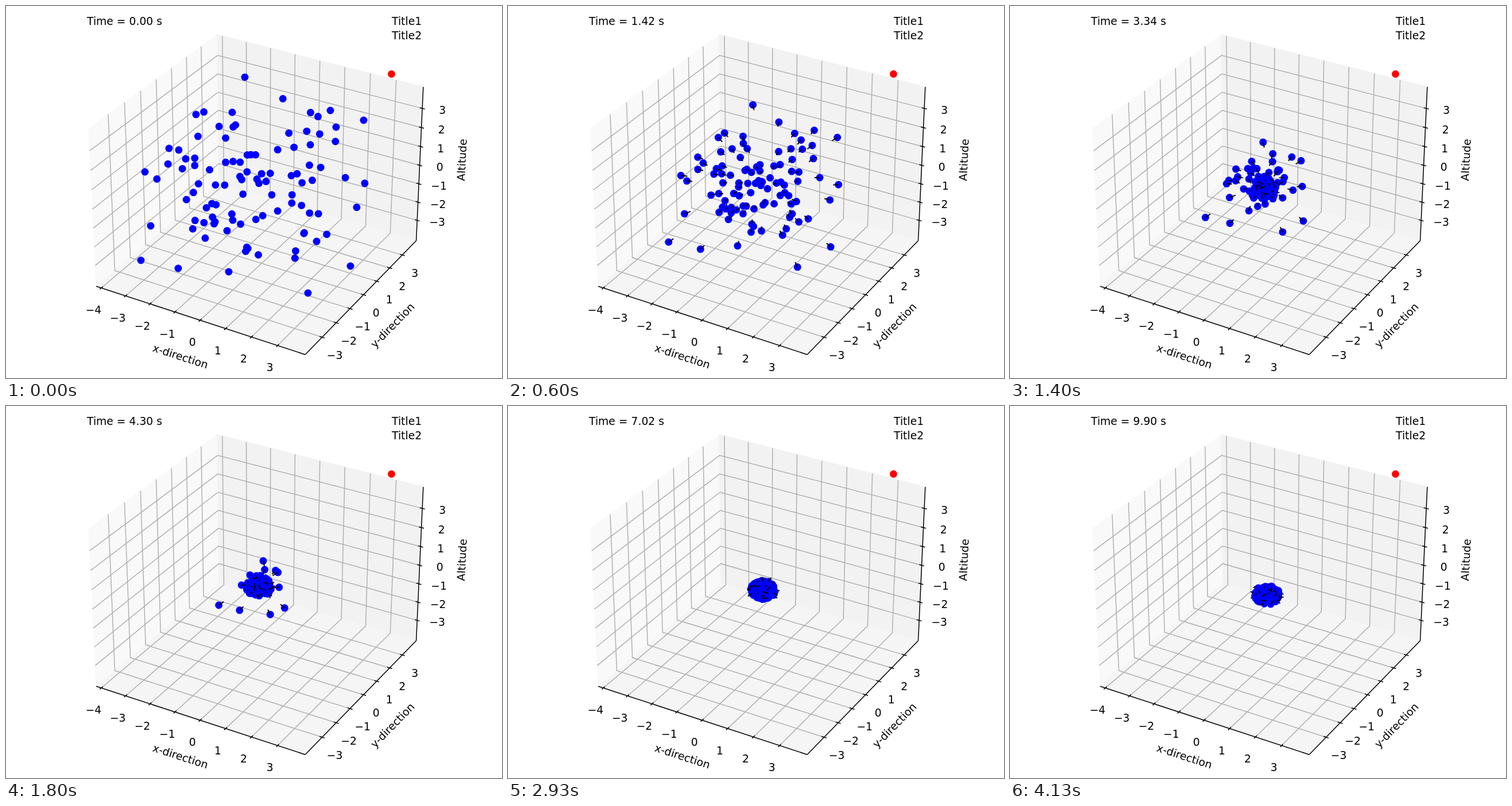
An HTML page for the animation above (4.19 s loop, 864 by 648 pixels).

```html
<!DOCTYPE html>
<html lang="en">
<head>
<meta charset="utf-8">
<title>Swarm in a box</title>
<style>
  html, body { margin: 0; width: 100%; height: 100%; overflow: hidden; background: #fff; }
  svg { display: block; width: 864px; height: 648px; }
  text { font: 18.75px "DejaVu Sans", sans-serif; fill: #000; }
</style>
</head>
<body>
<svg id="stage" viewBox="0 0 864 648"></svg>
<script>
const LOOP = 4190, LAST_STEP = 62;
const stage = document.getElementById("stage");

function add(parent, tag, attrs, content) {
  const node = document.createElementNS("http://www.w3.org/2000/svg", tag);
  for (const key in attrs) node.setAttribute(key, attrs[key]);
  if (content !== undefined) node.textContent = content;
  return parent.appendChild(node);
}

// Perspective camera: elevation 30, azimuth -60, distance 10
function project([x, y, z]) {
  const depth = 10 - (0.433 * x - 0.75 * y + 0.5 * z);
  const right = 0.866 * x + 0.5 * y;
  const up = -0.25 * x + 0.433 * y + 0.866 * z;
  return [441 + 3505 * right / depth, 315.2 - 3505 * up / depth];
}

const path = points => points.map(p => project(p).map(v => v.toFixed(2)).join()).join(" ");
const line = (points, stroke) =>
  add(stage, "polyline", { points: path(points), fill: "none", stroke, "stroke-width": 1.5 });
const pane = (points, fill) =>
  add(stage, "polygon", { points: path(points), fill, stroke: fill, "stroke-width": 1.5 });

function label(content, x, y, angle = 0) {
  add(stage, "text", {
    "text-anchor": "middle", y: 6.8,
    transform: `translate(${x.toFixed(2)} ${y.toFixed(2)}) rotate(${angle})`
  }, content);
}

// Half sizes of the box and the half length of a tick
const W = 0.595, H = 0.4464, TICK = 0.014;

const axes = [
  {
    from: -4, at: v => 0.0123 + 0.1442 * v, offset: [-13.5, 38],
    grid: x => [[x, -W, -H], [x, W, -H], [x, W, H]],
    tick: x => [[x, -W - TICK, -H], [x, -W, -H], [x, -W + TICK, -H]],
    edge: [[-W, -W, -H], [W, -W, -H]]
  },
  {
    from: -3, at: v => 0.003 + 0.1434 * v, offset: [22, 31.5],
    grid: y => [[W, y, -H], [-W, y, -H], [-W, y, H]],
    tick: y => [[W - TICK, y, -H], [W, y, -H], [W + TICK, y, -H]],
    edge: [[W, -W, -H], [W, W, -H]]
  },
  {
    from: -3, at: v => 0.001 + 0.1084 * v, offset: [35, 3],
    grid: z => [[-W, -W, z], [-W, W, z], [W, W, z]],
    tick: z => [[W - TICK, W, z], [W, W, z], [W + TICK, W, z]],
    edge: [[W, W, -H], [W, W, H]]
  }
];

function drawBox() {
  pane([[-W, -W, -H], [-W, W, -H], [-W, W, H], [-W, -W, H]], "#f9f9f9");
  pane([[-W, W, -H], [W, W, -H], [W, W, H], [-W, W, H]], "#f2f2f2");
  pane([[-W, -W, -H], [W, -W, -H], [W, W, -H], [-W, W, -H]], "#f5f5f5");
  for (const axis of axes)
    for (let v = axis.from; v <= 3; v++) line(axis.grid(axis.at(v)), "#b0b0b0");
  for (const axis of axes) {
    line(axis.edge, "#000");
    for (let v = axis.from; v <= 3; v++) {
      const tick = axis.tick(axis.at(v));
      const [x, y] = project(tick[1]);
      line(tick, "#000");
      label(v < 0 ? "\u2212" + -v : v, x + axis.offset[0], y + axis.offset[1]);
    }
  }
  label("x-direction", 304, 610, 18);
  label("y-direction", 673, 556, -45.7);
  label("Altitude", 794, 268, -87.3);
  add(stage, "text", { x: 672, y: 32.5 }, "Title1");
  add(stage, "text", { x: 672, y: 58 }, "Title2");
  add(stage, "circle", { cx: 671.5, cy: 118.5, r: 6.5, fill: "#f00" });
}

let seed = 11;
function random() {
  seed = (seed * 16807) % 2147483647;
  return seed / 2147483647;
}

const COUNT = 100, CENTER = [443, 314];

// The outermost dots give the swarm its outline
const outline = [
  [416, 124], [565, 182], [623, 199], [600, 453], [526, 500], [388, 463],
  [300, 457], [235, 443], [252, 383], [242, 289], [284, 248], [331, 189]
];

// A random place in a ball, seen from the front
function scatter() {
  const angle = random() * 2 * Math.PI;
  const radius = Math.sqrt(1 - random() ** (2 / 3));
  return [447 + 185 * radius * Math.cos(angle), 308 + 155 * radius * Math.sin(angle)];
}

function makeDot([x, y]) {
  const group = add(stage, "g", {});
  add(group, "circle", { r: 6.5, fill: "#00f" });
  return {
    x, y, group,
    tail: add(group, "line", { stroke: "#000", "stroke-width": 1.9 }),
    arrival: Math.hypot((CENTER[0] - x) / 50, (CENTER[1] - y) / 41, 3.1),
    angle: random() * 2 * Math.PI,
    radius: Math.sqrt(random()),
    heading: random() * 2 * Math.PI,
    spin: random() - 0.5
  };
}

// Steady flight to a place in the cluster, then a slow swirl
function moveDot(dot, time) {
  const progress = Math.min(1, time / dot.arrival);
  const settled = Math.max(0, time - dot.arrival);
  const drift = Math.max(0, time - 5.26);
  const angle = dot.angle + dot.spin * settled;
  const endX = CENTER[0] + 22 * dot.radius * Math.cos(angle) + 1.1 * drift;
  const endY = CENTER[1] + 17 * dot.radius * Math.sin(angle) + 3.2 * drift;
  const x = dot.x + (endX - dot.x) * progress;
  const y = dot.y + (endY - dot.y) * progress;
  const heading = dot.heading + settled;
  const tail = settled
    ? [9 * Math.cos(heading), 8 * Math.sin(heading)]
    : [endX - dot.x, endY - dot.y].map(v => v * 0.27 / dot.arrival);
  dot.group.setAttribute("transform", `translate(${x.toFixed(2)} ${y.toFixed(2)})`);
  dot.tail.setAttribute("x2", tail[0].toFixed(2));
  dot.tail.setAttribute("y2", tail[1].toFixed(2));
  dot.tail.setAttribute("visibility", time ? "visible" : "hidden");
}

drawBox();
const clock = add(stage, "text", { x: 141, y: 32.5 });
const dots = Array.from({ length: COUNT }, (_, i) => makeDot(outline[i] || scatter()));

function render(ms) {
  // Fifteen steps a second, on a 10 ms clock
  const step = Math.min(LAST_STEP, Math.floor((Math.floor(ms / 10) * 10 + 5) * 3 / 200));
  const time = Math.max(0, step * 0.16 - 0.02);
  clock.textContent = `Time = ${time.toFixed(2)} s`;
  for (const dot of dots) moveDot(dot, time);
}

const start = performance.now();
function loop() {
  render((performance.now() - start) % LOOP);
  requestAnimationFrame(loop);
}
loop();
</script>
</body>
</html>
```
